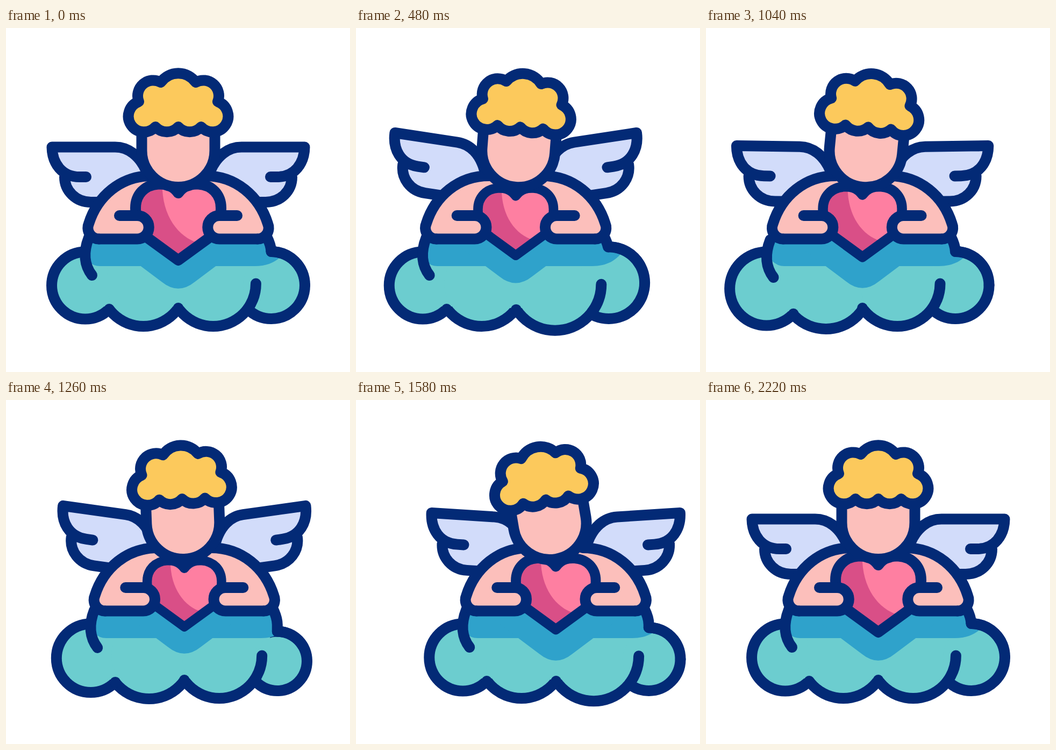
An HTML page without scripts that plays this animation: 640x640 px, repeating every 2.4 s.

```html
<!DOCTYPE html>
<html lang="en">
<head>
<meta charset="utf-8">
<title>Cupid on a cloud</title>
<style>
  @property --sway  { syntax: "<number>"; inherits: true; initial-value: 0; }
  @property --flap  { syntax: "<number>"; inherits: true; initial-value: 0; }
  @property --swell-right { syntax: "<number>"; inherits: true; initial-value: 0; }
  @property --swell-left  { syntax: "<number>"; inherits: true; initial-value: 0; }
  @property --shrink { syntax: "<number>"; inherits: true; initial-value: 0; }
  @property --lift  { syntax: "<number>"; inherits: true; initial-value: 0; }
  @property --beat  { syntax: "<number>"; inherits: true; initial-value: 1; }

  @keyframes sway { 0%, 9.2% { --sway: 0 } 32.4% { --sway: -52 } 67.8% { --sway: 52 } 90.3%, 100% { --sway: 0 } }
  @keyframes flap {
    0%, 8.33% { --flap: 0 } 20.24% { --flap: 8.6 } 32.5% { --flap: -5.5 }
    55.95% { --flap: 8.7 } 80.5% { --flap: -5.6 } 92.4%, 100% { --flap: 0 }
  }
  @keyframes swell-right {
    0%, 8.33%, 44%, 58%, 92%, 100% { --swell-right: 0 }
    26.2%, 73.8% { --swell-right: 1 }
  }
  @keyframes swell-left { 0%, 26.2%, 56.7%, 100% { --swell-left: 0 } 43.3% { --swell-left: 1 } }
  @keyframes shrink { 0%, 44%, 73.8%, 100% { --shrink: 0 } 59% { --shrink: 1 } }
  @keyframes lift {
    0%, 8.33%, 26.2%, 65.5%, 83.3%, 100% { --lift: 0 }
    17.3%, 35.1%, 52.5% { --lift: -13 }
    43.5% { --lift: -1 } 74.5% { --lift: -11 }
  }
  @keyframes beat {
    0%, 8.33%, 87.5%, 100% { --beat: 1 }
    17.3%, 35.1%, 52.5%, 74.5% { --beat: .87 }
    26.2%, 65.5% { --beat: .935 } 43.5% { --beat: .925 }
  }

  html, body { margin: 0; width: 100%; height: 100%; overflow: hidden; background: #fff; }
  svg {
    --navy: #032a76; --teal: #6ccdcf; --skin: #fcbfbb;
    display: block; width: 640px; height: 640px;
    animation: sway, flap, swell-right, swell-left, shrink, lift, beat;
    animation-duration: 2.4s;
    animation-iteration-count: infinite;
    animation-timing-function: cubic-bezier(.37, 0, .63, 1);
  }
  .line { fill: none; stroke: var(--navy); stroke-width: 20px; stroke-linecap: round; stroke-linejoin: round; }
  .skin { fill: var(--skin); }

  .cupid { transform: translateX(calc(var(--sway) * 1px)); }
  .head { transform: rotate(calc(var(--sway) * -.188deg)); transform-origin: 320.5px 295px; }
  .wing { transform: rotate(calc(var(--flap) * 1deg)); transform-origin: 267px 276px; }
  .heart { transform: scale(var(--beat)); transform-origin: 320.5px 355px; }
  .heart path { vector-effect: non-scaling-stroke; }

  /* cloud lobes, left to right */
  .a { --rad: (62.5 + 6 * var(--swell-left));
       cx: calc(147.5px - 5.5px * var(--swell-left)); cy: calc(479px + 6px * var(--swell-left)); }
  .b { --rad: (79.4 + 3 * var(--swell-left));
       cx: calc(255.5px - 3px * var(--swell-left) + 2px * var(--swell-right)); cy: calc(475.6px + 2px * var(--swell-left)); }
  .c { --rad: (79.4 + 9 * var(--swell-right));
       cx: calc(385.5px + 11px * var(--swell-right)); cy: calc(475.6px + 1.5px * var(--swell-right)); }
  .d { --rad: (62.5 + 6 * var(--swell-right) - 12 * var(--shrink));
       cx: 493.5px; cy: calc(541px - 1px * var(--rad)); }
  circle.line { r: calc(1px * var(--rad)); }
  .rim circle { fill: var(--navy); }
  .core { fill: var(--teal); }
  .core circle, clipPath circle { r: calc(1px * (var(--rad) - 10)); }
  .fill-left { height: calc(93px + 9px * var(--swell-left)); }
  .fill-right { height: calc(93px + 4px * var(--swell-right)); }
  .arc-c { stroke-dasharray: 36.7 323.3; }
  .arc-d { stroke-dasharray: 0 270 60 30; }
  .edge-left { transform: translate(calc(-5px * var(--swell-left)), calc(4px * var(--swell-left))); }
  .edge-right { stroke-dasharray: calc(29.5px + 24px * var(--shrink) - 12px * var(--swell-right)) 199px; }
  .joint { fill: var(--navy); r: 10px; }
  .joint-left { cx: 192px; cy: calc(523px + 8.7px * var(--swell-left)); }
  .joint-mid { cx: calc(320.5px + 1px * var(--swell-right)); cy: calc(521px + 4px * var(--swell-right)); }
  .shade { fill: #2fa2cb; }
  .cast { transform: translateY(calc(1px * var(--lift))); }
</style>
</head>
<body>
<svg viewBox="0 0 640 640">
  <defs>
    <clipPath id="inside">
      <rect x="150" y="390" width="342" height="110"/>
      <circle class="d"/>
    </clipPath>
    <g id="wing">
      <g class="wing">
        <path fill="#d2dcfa" d="M85.5 221.5H203C228 221.5 248 238 260 264L230 324H158C130 324 109 303 109 274C94 265 86 245 85.5 221.5"/>
        <path class="line" d="M149 277H137C104 277 86 252 85.5 221.5H203C228 221.5 248 238 260 264M109 277C109 303 130 324 158 324H200"/>
      </g>
    </g>
    <g id="arm">
      <path class="skin" d="M173 392.5A20.5 20.5 0 0 1 154 364C170 313 213 275 271 275H321V340L244 371V392Z"/>
      <path class="line" d="M173 392.5A20.5 20.5 0 0 1 154 364C170 313 213 275 271 275"/>
    </g>
    <path id="hand" class="line" style="fill:var(--skin)" d="M211 349H244A21.75 21.75 0 0 1 244 392.5H173"/>
    <path id="heart" d="M320.5 307C308 290 293 290 283 290.5C258 292 241 310 241 335C241 358 246 378 256 385L320.5 432L385 385C395 378 400 358 400 335C400 310 383 292 358 290.5C348 290 333 290 320.5 307Z"/>
    <clipPath id="heart-shape"><use href="#heart"/></clipPath>
  </defs>

  <g class="cupid">
    <use href="#wing"/>
    <use href="#wing" transform="translate(641) scale(-1 1)"/>

    <g class="rim">
      <circle class="line a"/><circle class="line b"/><circle class="line c"/><circle class="line d"/>
    </g>
    <g class="core">
      <rect class="fill-left" x="160" y="425" width="97"/>
      <rect class="fill-right" x="256" y="425" width="224"/>
      <circle class="a"/><circle class="b"/><circle class="c"/><circle class="d"/>
    </g>
    <circle class="joint joint-left"/>
    <circle class="joint joint-mid"/>
    <g class="shade" clip-path="url(#inside)">
      <path d="M152 388H493L520 415C508 432 490 443 463 443H175Q162 443 152 433Z"/>
      <path class="cast" d="M200 405L290 472.5Q320.5 497 351 472.5L441 405Z"/>
    </g>
    <circle class="line c arc-c" pathLength="360"/>
    <circle class="line d arc-d" pathLength="360"/>
    <path class="line edge-left" d="M160 460C146 442 143 418 154 390"/>
    <path class="line edge-right" d="M485 388C491 400 493.5 409 493.5 418V445"/>

    <use href="#arm"/>
    <use href="#arm" transform="translate(641) scale(-1 1)"/>

    <g class="heart">
      <use href="#heart" fill="#d94f87"/>
      <path clip-path="url(#heart-shape)" fill="#fe7fa1" d="M291 280C287 345 318 388 358 400H410V280Z"/>
      <use href="#heart" class="line"/>
    </g>

    <use href="#hand"/>
    <use href="#hand" transform="translate(641) scale(-1 1)"/>

    <g class="head">
      <path class="line" style="fill:var(--skin)" d="M252.5 185V228A68 68 0 0 0 388.5 228V185"/>
      <path class="line" style="fill:#fcc95c" d="M278 184A29 29 0 1 1 247 137A29 29 0 0 1 288 101A40 40 0 0 1 353 101A29 29 0 0 1 394 137A29 29 0 1 1 363 184A29 29 0 0 1 320.5 184A29 29 0 0 1 278 184Z"/>
    </g>
  </g>
</svg>
</body>
</html>
```
